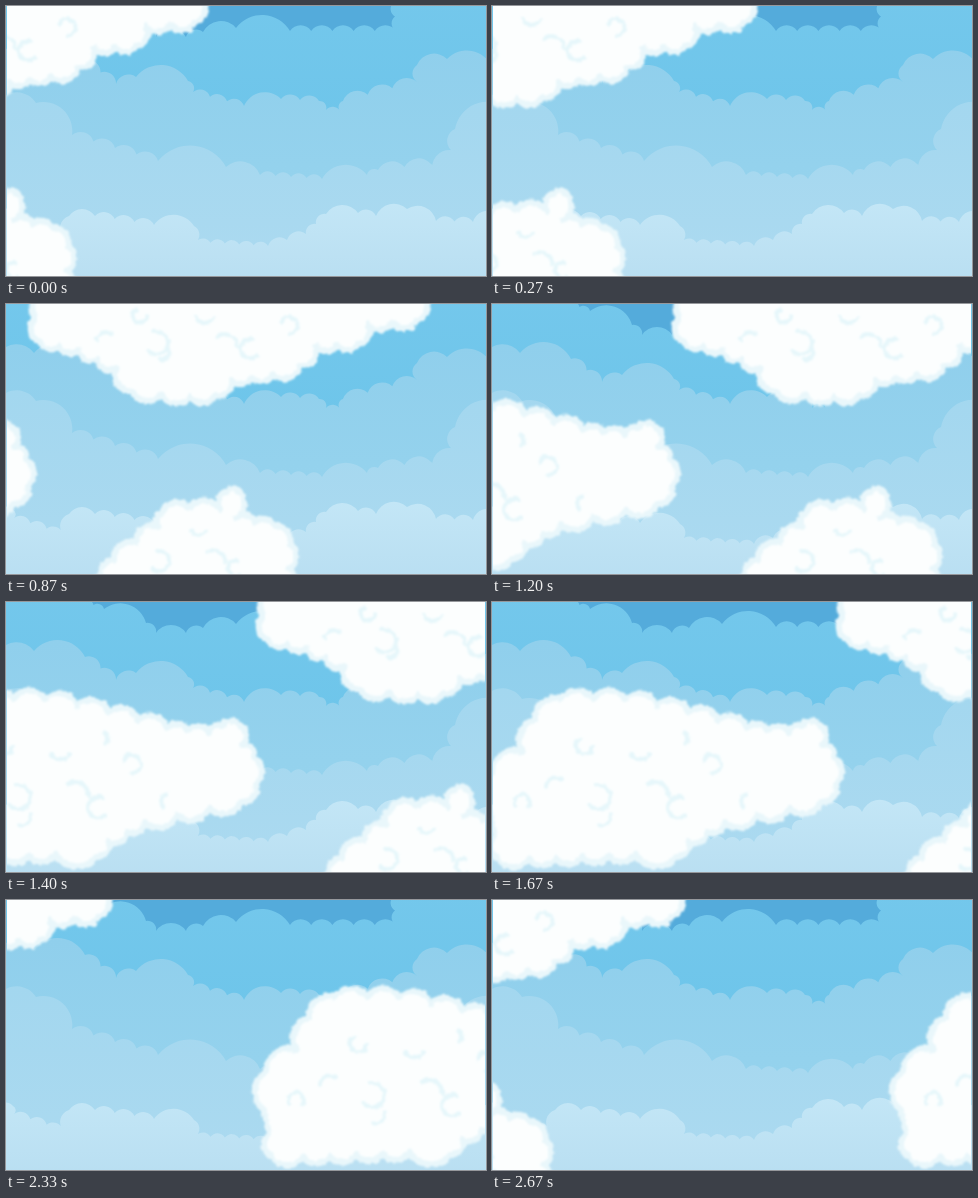
An HTML page that plays this animation: 480 px wide and 270 px high, repeating every 2.79 s.

```html
<!DOCTYPE html>
<html lang="en">
<head>
<meta charset="utf-8">
<title>Drifting clouds</title>
<style>
  html, body { margin: 0; width: 100%; height: 100%; overflow: hidden; background: #54abdb; }
  #stage { display: block; width: 480px; height: 270px; }
  .puff { fill: #fcfefe; stroke: #e9f7fb; stroke-width: 6; stroke-linejoin: round; }
  .swirl { fill: none; stroke: #e6f7fb; stroke-width: 4; stroke-linecap: round; }
</style>
</head>
<body>
<svg id="stage" viewBox="0 0 480 270">
  <defs>
    <filter id="rough" x="-5%" y="-10%" width="110%" height="120%">
      <feTurbulence type="fractalNoise" baseFrequency=".18" numOctaves="2" seed="4"/>
      <feDisplacementMap in="SourceGraphic" scale="5" xChannelSelector="R" yChannelSelector="G"/>
      <feGaussianBlur stdDeviation=".9"/>
    </filter>
  </defs>
  <g id="sky" transform="translate(0 1)"></g>
  <svg x="1" width="478" height="270">
    <g id="front"></g>
    <g id="next"></g>
    <g id="big"></g>
  </svg>
</svg>
<script>
const $ = id => document.getElementById(id);

// Runs humps along a line of corners [x, y, humps since the last corner].
function puffs([[x, y], ...corners]) {
  let d = `M${x} ${y}`;
  for (const [toX, toY, humps = 1] of corners) {
    const dx = (toX - x) / humps, dy = (toY - y) / humps;
    const r = Math.hypot(dx, dy) * 0.6;
    d += `a${r} ${r} 0 0 1 ${dx} ${dy}`.repeat(humps);
    [x, y] = [toX, toY];
  }
  return d;
}

function bank(id, top, bottom, corners) {
  $('sky').insertAdjacentHTML('beforeend',
    `<linearGradient id="${id}" x2="0" y2="1"><stop stop-color="${top}"/><stop offset="1" stop-color="${bottom}"/></linearGradient>
     <path fill="url(#${id})" d="${puffs(corners)}L500 280H-10Z"/>`);
}

// Open rings on a golden-angle spiral, shrinking outwards.
function swirls({ cx, cy, rx, ry, count }) {
  let rings = '';
  for (let i = 0; i < count; i++) {
    const far = Math.sqrt((i + 0.5) / count), turn = i * 2.4;
    const r = 15 - 8 * far;
    const x = cx + rx * far * Math.cos(turn), y = cy + ry * far * Math.sin(turn);
    rings += `<path class="swirl" transform="translate(${x} ${y}) rotate(${i * 77})"
      d="M${-r} 0A${r} ${r} 0 ${i % 2} 1 ${r * 0.5} ${r * 0.86}"/>`;
  }
  return rings;
}

const cloud = (corners, spiral) =>
  `<g filter="url(#rough)"><path class="puff" d="${puffs(corners)}Z"/>${swirls(spiral)}</g>`;

bank('far', '#75c8ec', '#66c2e8', [
  [-10, -10], [77, -2], [98, 6, 2], [140, 20], [150, 30], [180, 30], [197, 25], [230, 21],
  [284, 24], [390, 24, 5], [388, -5, 2], [500, -10]]);
bank('mid', '#90cfec', '#98d5ee', [
  [-8, 50], [28, 48], [79, 54], [110, 77, 2], [130, 70], [182, 74], [187, 85], [238, 99, 3],
  [275, 92], [313, 94, 2], [320, 103], [334, 104], [337, 94], [411, 75, 3], [411, 58],
  [441, 52], [486, 60]]);
bank('near', '#a3d7ef', '#acdaf0', [
  [-8, 95], [30, 96], [66, 128], [152, 154, 4], [220, 160], [254, 168], [316, 172, 4],
  [361, 168], [372, 163], [425, 157, 2], [427, 165], [445, 143], [449, 122], [500, 100]]);
bank('low', '#c3e6f6', '#b8def1', [
  [-10, 207], [7, 205], [8, 213], [57, 229, 3], [63, 209], [89, 209], [148, 218, 3],
  [188, 219], [190, 235], [262, 239, 5], [300, 227, 2], [320, 207, 2], [352, 206],
  [370, 209], [401, 202], [430, 214], [467, 215, 2], [490, 207]]);

const upper = cloud([
  [195, -10], [188, 17], [140, 20, 2], [130, 40], [88, 42, 2], [72, 62], [44, 71], [4, 76, 2],
  [-12, 91], [-38, 93], [-95, 88, 2], [-112, 64], [-150, 46, 2], [-188, 38, 2], [-193, 14],
  [-184, -12]],
  { cx: -30, cy: 32, rx: 130, ry: 24, count: 8 });
const lower = cloud([
  [-140, 290], [-114, 256, 2], [-70, 222, 2], [-66, 208], [-38, 204], [-8, 205], [0, 187],
  [10, 187], [8, 214], [46, 222, 2], [62, 240], [60, 290, 2]],
  { cx: -35, cy: 248, rx: 75, ry: 22, count: 4 });
$('front').innerHTML = $('next').innerHTML = upper + lower;
$('big').innerHTML = cloud([
  [1, 210], [3, 172], [34, 150], [46, 118], [72, 97], [136, 97, 2], [200, 110, 2], [258, 126, 2],
  [300, 131, 2], [312, 124], [332, 124], [333, 143], [345, 156], [347, 182], [332, 200],
  [300, 206], [236, 220, 2], [200, 240, 2], [188, 254], [146, 252], [40, 257, 4], [8, 256], [6, 234]],
  { cx: 145, cy: 182, rx: 130, ry: 52, count: 11 });

const LOOP = 2790, END = 2670, STEP = 200 / 3;
const WRAP = 850;        // distance between one cloud pair and the next
const BIG_LAG = 547;     // how far the big cloud trails the first pair

// Offsets [ms, px], joined by straight runs.
const drift = [[0, 0], [600, 142], [870, 223], [1200, 380], [2070, 685], [END, 957]];
const entry = [[0, -WRAP], [2070, 685 - WRAP], [END, -8]];

function along(keys, t) {
  const i = Math.max(1, keys.findIndex(([end]) => end >= t));
  const [t0, x0] = keys[i - 1], [t1, x1] = keys[i];
  return x0 + (x1 - x0) * (t - t0) / (t1 - t0);
}

const place = (id, x) => $(id).setAttribute('transform', `translate(${Math.round(x) - 1} 0)`);

function frame() {
  const now = performance.now() % LOOP;
  const t = Math.min(END, Math.floor((now + 4) / STEP) * STEP);
  const x = along(drift, t);
  place('front', x);
  place('next', along(entry, t));
  place('big', x - BIG_LAG);
  requestAnimationFrame(frame);
}
frame();
</script>
</body>
</html>
```
